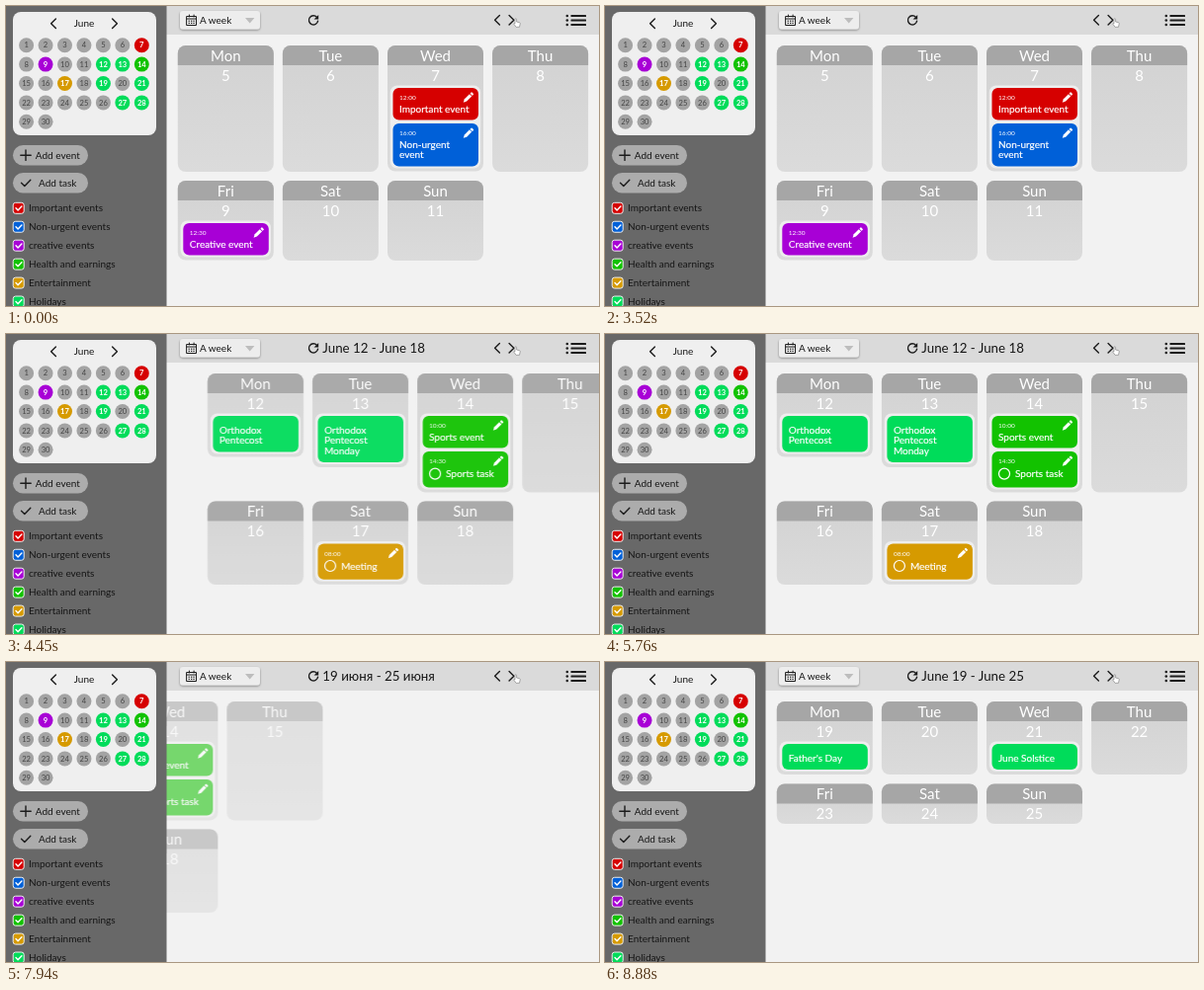
These frames come from a looping animation (600x304 px, 10000 ms). An HTML page:

```html
<!DOCTYPE html>
<html lang="en">
<head>
<meta charset="utf-8">
<title>Week planner</title>
<style>
  html, body { margin: 0; width: 100%; height: 100%; overflow: hidden; background: #f2f2f2; }
  svg { display: block; width: 100%; height: 100%; }
  text { font-family: Lato, "Open Sans", sans-serif; font-size: 10px; fill: #151515; }
  .mid { text-anchor: middle; }
  .head { font-size: 15px; fill: #fff; }
  .title { font-size: 13.3px; }
  .date { font-size: 7.6px; fill: #444; }
  .date.on { fill: #fff; font-weight: 700; }
  .time { font-size: 6.5px; fill: #fff; }
  .label { fill: #fff; stroke: #fff; stroke-width: .2px; }
  .line { fill: none; stroke: #1c1c1c; stroke-width: 1.4; stroke-linecap: round; stroke-linejoin: round; }
  .white { stroke: #fff; }
</style>
</head>
<body>
<svg id="stage" viewBox="0 0 600 304">
  <defs>
    <linearGradient id="body" x2="0" y2="1">
      <stop stop-color="#d2d2d2"/><stop offset="1" stop-color="#dbdbdb"/>
    </linearGradient>
    <filter id="shadow" x="-10%" y="-20%" width="120%" height="150%">
      <feDropShadow dx="0" dy="1" stdDeviation=".8" flood-opacity=".4"/>
    </filter>
  </defs>
</svg>
<script>
const LOOP = 10000, SLIDE = 470, TRAVEL = 600;
const turns = [3642, 7815];
const C = {
  red: '#d60000', blue: '#0060d8', purple: '#a800d6',
  green: '#12c200', orange: '#d69a00', mint: '#00dc5a'
};

const text = (x, y, s, cls = '') => `<text x="${x}" y="${y}" class="${cls}">${s}</text>`;
const rect = (x, y, w, h, r, fill, more = '') =>
  `<rect x="${x}" y="${y}" width="${w}" height="${h}" rx="${r}" fill="${fill}" ${more}/>`;
const circle = (x, y, r, fill, more = '') => `<circle cx="${x}" cy="${y}" r="${r}" fill="${fill}" ${more}/>`;
const line = (d, cls = '', more = '') => `<path d="${d}" class="line ${cls}" ${more}/>`;
const chevron = (x, y, dir) => line(`M${x - 2.4 * dir} ${y - 4.8}l${4.8 * dir} 4.8l${-4.8 * dir} 4.8`);

const pencil = (x, y) => `<g transform="translate(${x} ${y}) rotate(45)" fill="#fff">
  <path d="M-1.6-3.7h3.2v7.2L0 6.7l-1.6-3.2z"/><rect x="-1.6" y="-6.7" width="3.2" height="2.2" rx=".6"/></g>`;

// An event: its lines, with an optional time and task ring
function eventBox(x, y, e) {
  let s = rect(x + 5.5, y, 86.5, e.h, 6, C[e.color]);
  const first = y + (e.time ? (e.task ? 26.3 : 24.7) : 17.7);
  if (e.time) s += text(x + 12, y + 12, e.time, 'time') + pencil(x + 81.5, y + 10);
  if (e.task) s += circle(x + 18, y + 22.5, 5.5, 'none', 'stroke="#fff" stroke-width="1.2"');
  e.lines.forEach((l, i) => s += text(x + (e.task ? 29 : 12), first + i * 10.6, l, 'label'));
  return s;
}

function dayCard(i, date, top, rowHeight, events = []) {
  const x = 173.8 + (i % 4) * 106.1;
  const used = events.reduce((sum, e) => sum + e.h + 3.6, 0);
  const h = used ? 43 + used + 1.4 : rowHeight;
  let s = rect(x, top, 97, h, 8, 'url(#body)');
  if (used) s += rect(x + 2.8, top + 40.5, 91.4, h - 43.5, 7, '#eee');
  s += `<path d="M${x} ${top + 20}v-12a8 8 0 0 1 8-8h81a8 8 0 0 1 8 8v12z" fill="#a6a6a6"/>`;
  s += text(x + 48.5, top + 15.8, ['Mon', 'Tue', 'Wed', 'Thu', 'Fri', 'Sat', 'Sun'][i], 'head mid');
  s += text(x + 48.5, top + 35.6, date, 'head mid');
  let y = top + 43;
  for (const e of events) {
    s += eventBox(x, y, e);
    y += e.h + 3.6;
  }
  return s;
}

const weeks = [
  { start: 5, rows: [[40, 128], [177, 81]], events: {
    2: [{ color: 'red', h: 32.5, time: '12:00', lines: ['Important event'] },
        { color: 'blue', h: 43.5, time: '16:00', lines: ['Non-urgent', 'event'] }],
    4: [{ color: 'purple', h: 32.5, time: '12:30', lines: ['Creative event'] }] } },
  { start: 12, rows: [[40, 120.5], [169.5, 84.5]], events: {
    0: [{ color: 'mint', h: 36.5, lines: ['Orthodox', 'Pentecost'] }],
    1: [{ color: 'mint', h: 47, lines: ['Orthodox', 'Pentecost', 'Monday'] }],
    2: [{ color: 'green', h: 32.5, time: '10:00', lines: ['Sports event'] },
        { color: 'green', h: 36.3, time: '14:30', task: true, lines: ['Sports task'] }],
    5: [{ color: 'orange', h: 36.3, time: '08:00', task: true, lines: ['Meeting'] }] } },
  { start: 19, rows: [[40, 74], [123.5, 40.5]], events: {
    0: [{ color: 'mint', h: 26, lines: ["Father's Day"] }],
    2: [{ color: 'mint', h: 26, lines: ['June Solstice'] }] } }
];

const weekView = w => '<g class="week">' + [0, 1, 2, 3, 4, 5, 6].map(i =>
  dayCard(i, w.start + i, ...w.rows[i < 4 ? 0 : 1], w.events[i])).join('') + '</g>';

const titles = [
  [0, 'June 5 - June 11'],
  [turns[0], '12 июня - 18 июня'],
  [turns[0] + SLIDE, 'June 12 - June 18'],
  [turns[1], '19 июня - 25 июня'],
  [turns[1] + SLIDE, 'June 19 - June 25']
];

function toolbar() {
  let s = rect(162, 0, 438, 29, 0, '#dadada');
  s += rect(176, 5, 81, 18.5, 3, '#ededed', 'filter="url(#shadow)"');
  s += line('M183 10.5h9.5v9h-9.5zM183 13h9.5M185.4 9v2M190.1 9v2', '', 'stroke-width="1" style="stroke-width:1"');
  for (let i = 0; i < 6; i++) s += rect(184.6 + (i % 3) * 2.4, 14.6 + (i > 2) * 2.2, 1.3, 1.2, 0, '#1c1c1c');
  s += text(196, 18, 'A week') + '<path d="M242 12h9.4l-4.7 5.4z" fill="#bdbdbd"/>';
  s += line('M314.6 11.4a4.6 4.6 0 1 0 1 3.7') + '<path d="M316.2 9v4.6h-4.6z" fill="#1c1c1c"/>';
  s += titles.map(([, label]) => text(320.3, 18.6, label, 'title')).join('');
  s += chevron(497, 14.2, -1) + chevron(511.5, 14.2, 1);
  for (const y of [10, 14.5, 19])
    s += circle(567.8, y, 1.3, '#1c1c1c') + rect(571.5, y - 1, 15.5, 2, .5, '#1c1c1c');
  // Pointing hand
  s += `<path d="M515 13.2q.9-1 1.6 0v2.8l3 .7q.8.4.6 1.4l-.7 3.2h-3.4l-2.4-3.2q.2-1 1.3-.2z"
    fill="#fff" stroke="#777" stroke-width=".6"/>`;
  return s;
}

function sidebar() {
  let s = rect(0, 0, 162.5, 304, 0, '#686868');
  s += rect(7, 6, 145, 125, 8, '#efefef');
  s += chevron(48, 17.8, -1) + chevron(110, 17.8, 1) + text(79, 21.3, 'June', 'mid');
  const marks = { 7: 'red', 9: 'purple', 12: 'mint', 13: 'mint', 14: 'green', 17: 'orange',
    19: 'mint', 21: 'mint', 27: 'mint', 28: 'mint' };
  for (let d = 1; d <= 30; d++) {
    const x = 20.6 + ((d - 1) % 7) * 19.45, y = 39.7 + Math.floor((d - 1) / 7) * 19.4;
    s += circle(x, y, 7.5, C[marks[d]] || '#a3a3a3');
    s += text(x, y + 2.7, d, 'date mid' + (marks[d] ? ' on' : ''));
  }
  s += rect(7, 141, 76, 20.5, 10.2, '#acacac') + line('M14.8 151.2h10.4M20 146v10.4') + text(29.8, 154.7, 'Add event');
  s += rect(7, 169, 76, 20.5, 10.2, '#acacac') + line('M15.5 179.3l3.3 3.3 6-6.4') + text(33, 183, 'Add task');
  const groups = [['red', 'Important events'], ['blue', 'Non-urgent events'], ['purple', 'creative events'],
    ['green', 'Health and earnings'], ['orange', 'Entertainment'], ['mint', 'Holidays']];
  groups.forEach(([color, label], i) => {
    const y = 204.8 + i * 18.95;
    s += rect(7.2, y - 5.5, 11, 11, 2.5, C[color], 'stroke="#eee" stroke-width="1"');
    s += line(`M10 ${y}l2.1 2.2 3.8-4`, 'white') + text(23, y + 3.6, label);
  });
  return s;
}

const stage = document.getElementById('stage');
stage.insertAdjacentHTML('beforeend', weeks.map(weekView).join('') + toolbar() + sidebar());

const play = (el, frames) => el.animate(frames, { duration: LOOP, iterations: Infinity });
const pose = (time, x, opacity, easing = 'linear') =>
  ({ offset: time / LOOP, transform: `translateX(${x}px)`, opacity, easing });

stage.querySelectorAll('.week').forEach((el, i) => {
  const frames = [];
  if (i) {
    const enter = turns[i - 1] + SLIDE;
    frames.push(pose(0, TRAVEL, 0), pose(enter, TRAVEL, 0, 'ease'), pose(enter + SLIDE, 0, 1));
  } else frames.push(pose(0, 0, 1));
  if (i < turns.length) {
    const leave = turns[i];
    frames.push(pose(leave, 0, 1, 'ease'), pose(leave + SLIDE, -TRAVEL, 0), pose(LOOP, -TRAVEL, 0));
  } else frames.push(pose(LOOP, 0, 1));
  play(el, frames);
});

stage.querySelectorAll('.title').forEach((el, i) => {
  const from = titles[i][0], to = titles[i + 1] ? titles[i + 1][0] : LOOP;
  play(el, [[0, 0], [from, 1], [to, 0], [LOOP, 0]].map(([time, opacity]) =>
    ({ offset: time / LOOP, opacity, easing: 'step-end' })));
});
</script>
</body>
</html>
```
